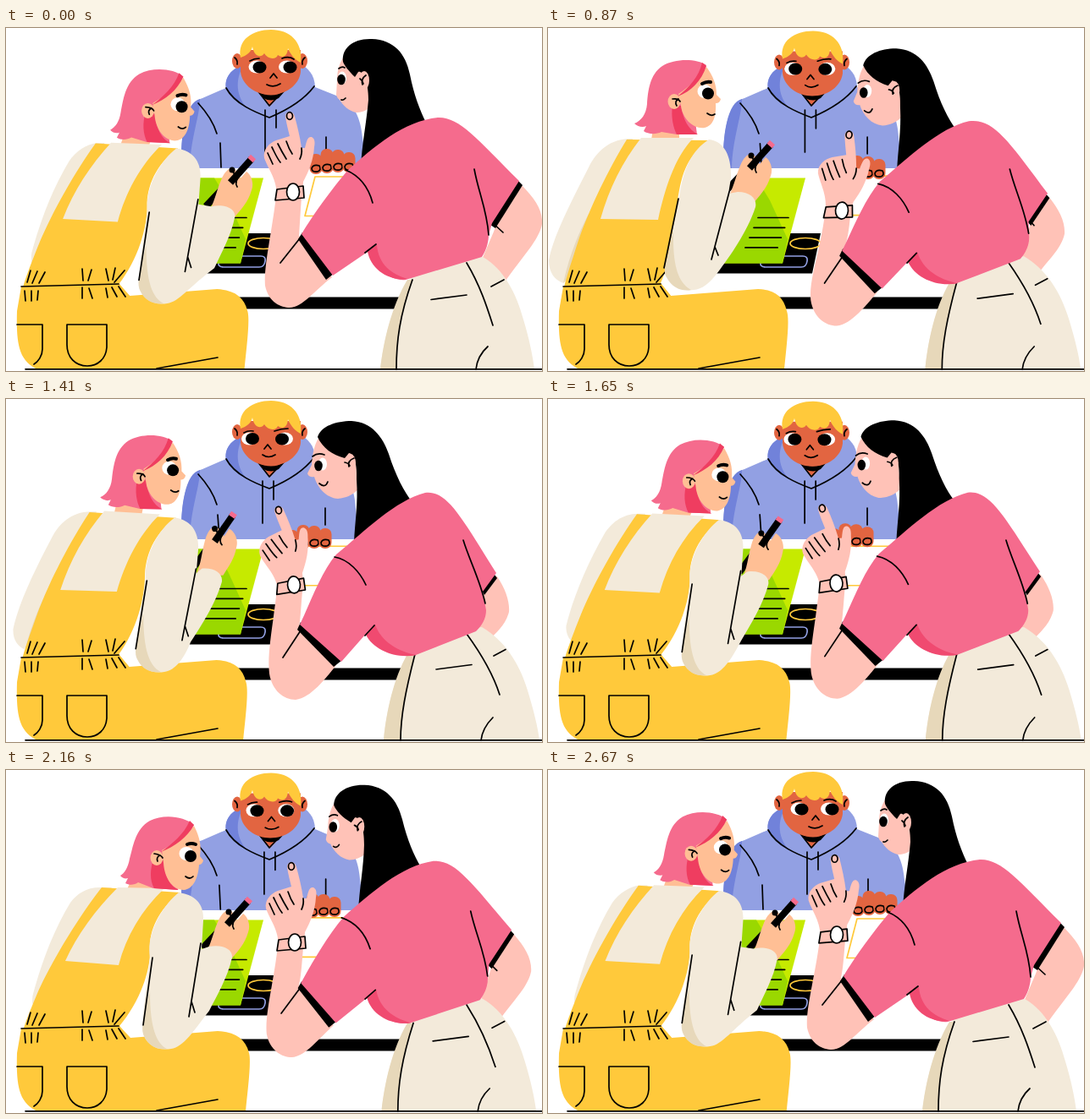
An HTML page for the animation above (2.7 s loop, 633 px wide and 406 px high).

```html
<!DOCTYPE html>
<html lang="en">
<head>
<meta charset="utf-8">
<title>Table talk</title>
<style>
html, body { margin: 0; width: 100%; height: 100%; overflow: hidden; background: #fff; }
svg { display: block; width: 100%; height: 100%; }
</style>
</head>
<body>
<svg id="stage" viewBox="0 0 633 406"></svg>
<script>
const LOOP = 2700, STEP = 30;
const TIMES = [0, 420, 870, 1410, 1890, 2160, 2670];
const C = {
  ink: '#000', white: '#fff', yellow: '#ffc93b', pink: '#f56b8d', red: '#ef3d60', rose: '#f04a70',
  blue: '#92a0e3', navy: '#7182da', brick: '#e26541', blush: '#ffc2b7', peach: '#ffbf95',
  cream: '#f3eada', sand: '#e7d8ba', lime: '#c6ea00', green: '#9ad800'
};

// Motion tracks, one value per time in TIMES
const tracks = {
  lean:   [.64, .03, 0, .28, .9, 1, .69],
  elbow:  [.8, .03, 0, .65, .97, 1, .85],
  cuff:   [1.15, .15, 0, .45, .9, 1, 1.17],
  far:    [.95, .35, 0, .24, 1, 1, 1],
  bend:   [0, .04, .86, 1, .83, .36, 0],
  back:   [0, .05, .59, 1, .77, .33, 0],
  bob:    [0, 0, 1.5, 0, 1.5, 1.5, 0],
  wristX: [338, 326, 346, 339, 340, 340, 340],
  wristY: [194, 196, 216, 220, 214, 204, 195],
  wristA: [0, -21, 8, -9, -6, 0, 1],
  penX:   [270, 246, 243, 252, 262, 266, 271],
  penY:   [188, 173, 171, 173, 185, 188, 189],
  penA:   [0, 5, 0, -7, -5, 0, 0],
  fistX:  [0, 0, -14, -28, -28, -17, 0],
  fistY:  [0, -1, 8, 6, 3, 3, 0]
};

const N = TIMES.length;
const keyTime = i => TIMES[(i + N) % N] + LOOP * Math.floor(i / N);
const keyVal = (v, i) => v[(i + N) % N];
function slope(v, i) {
  const a = (keyVal(v, i) - keyVal(v, i - 1)) / (keyTime(i) - keyTime(i - 1));
  const b = (keyVal(v, i + 1) - keyVal(v, i)) / (keyTime(i + 1) - keyTime(i));
  return a * b > 0 ? 2 * a * b / (a + b) : 0;
}
// Smooth periodic curve without overshoot
function sample(v, t) {
  let i = N - 1;
  while (TIMES[i] > t) i--;
  const h = keyTime(i + 1) - keyTime(i), u = (t - keyTime(i)) / h, w = 1 - u;
  return w * w * (1 + 2 * u) * keyVal(v, i) + u * u * (3 - 2 * u) * keyVal(v, i + 1)
    + h * u * w * (w * slope(v, i) - u * slope(v, i + 1));
}

const NUM = /-?\d*\.?\d+/g;
function mix(a, b, k) {
  const to = b.match(NUM);
  let i = 0;
  return a.replace(NUM, n => (+n + (to[i++] - n) * k).toFixed(2));
}

const stage = document.getElementById('stage');
const updates = [];
let layer = stage;

function make(tag, attrs) {
  const el = document.createElementNS('http://www.w3.org/2000/svg', tag);
  for (const k in attrs) el.setAttribute(k, attrs[k]);
  return layer.appendChild(el);
}
const pen = (color = C.ink, width = 1.7) => ({
  fill: 'none', stroke: color, 'stroke-width': width, 'stroke-linecap': 'round', 'stroke-linejoin': 'round'
});
const outlined = fill => ({ ...pen(), fill });

// A path is fixed, or built of [track, from, to] pieces
function path(style, ...segs) {
  const el = make('path', style);
  if (typeof segs[0] === 'string') el.setAttribute('d', segs[0]);
  else updates.push(s => el.setAttribute('d', segs.map(([k, a, b]) => mix(a, b, s[k])).join(' ')));
}
const fill = (color, ...segs) => path({ fill: color }, ...segs);
const line = (...segs) => path(pen(), ...segs);
const oval = (style, cx, cy, rx, ry) => make('ellipse', { ...style, cx, cy, rx, ry });
function group(move, draw) {
  const outer = layer;
  const el = layer = make('g', {});
  draw();
  layer = outer;
  updates.push(s => el.setAttribute('transform', move(s)));
}
function blob(color, track, a, b, rx, ry) {
  const el = oval({ fill: color }, a[0], a[1], rx, ry);
  updates.push(s => ['cx', 'cy'].forEach((k, i) => el.setAttribute(k, a[i] + (b[i] - a[i]) * s[track])));
}

function man() {
  fill(C.blue, ['bend',
    'M207 166 C206 125 212 88 232 83 L262 70 L365 70 L395 82 C412 90 419 108 421 130 C424 146 422 158 422 166Z',
    'M207 166 C206 125 212 88 232 83 L262 70 L365 70 L390 82 C405 90 412 108 413 130 C415 146 414 158 414 166Z']);
  fill(C.navy, 'M207 166 C206 125 212 88 229 84 C229 104 218 130 217 166Z');
  line('M227 89 C239 102 245 112 249 125');
  line(['bend', 'M253 136 L254 165 M378 129 L378 148', 'M250 137 L252 165 M377 129 L377 149']);
  fill(C.blue, 'M282 42 C262 50 258 62 260 72 C270 90 295 100 311 106 C330 98 352 85 365 69 C364 55 357 47 346 42Z');
  fill(C.navy, 'M282 42 C262 50 258 62 260 72 C268 84 276 90 285 95 C269 78 272 56 282 42Z');
  line('M260 71 C270 90 295 100 311 106 C330 98 352 85 364 69');
  line(['bend', 'M306 97 V147 M319 97 V118', 'M303 97 V147 M316 97 V119']);
  fill(C.brick, 'M291 66 L312 92 L337 66Z');
  fill(C.ink, 'M296 74 Q313 85 330 74 L322 83 Q313 88 304 83Z');
  line('M297 74 L311 92 L328 74');
  group(s => `translate(0 ${s.bob})`, () => {
    for (const x of [273, 350]) oval({ fill: C.brick }, x, 39, 6, 9);
    line('M270 35 Q274 38 273 43 M353 35 Q349 38 350 43');
    fill(C.brick, 'M277 26 V52 C279 68 295 79 312 79 C330 79 346 68 348 52 V26Z');
    fill(C.yellow, 'M277 35 C273 14 291 2 313 2 C335 2 351 16 348 41 C342 38 336 32 333 24 C332 34 327 36 321 32 C319 38 309 37 305 30 C301 36 293 34 291 22 C290 28 284 33 277 35Z');
    blob(C.white, 'bend', [296, 46], [287.5, 47], 9.5, 7.5);
    blob(C.white, 'bend', [331.5, 46], [329.5, 47], 9.5, 7.5);
    blob(C.ink, 'bend', [299.5, 46.5], [291, 47], 8, 7);
    blob(C.ink, 'bend', [335.5, 46.5], [326, 47.5], 8, 7);
    line(['bend',
      'M288 39 Q293 36 299 36 M326 36 Q334 33 340 37 M312 59 L316 54 L320 59 M308 67 Q316 71 324 66',
      'M281 40 Q286 37 292 38 M317 38 Q325 35 333 35 M305 59 L309 54 L313 59 M303 66 Q310 71 318 66']);
  });
}

function table() {
  fill(C.ink, 'M262 318.500 H490 V332.500 H262Z M198 243 H322 L312 290.500 H188Z');
  oval(pen(C.yellow), 304, 255, 18, 6.500);
  path(pen(C.blue), 'M259 270 H301 Q307 270 306 276 Q305 283 299 283 H257 Q250 283 251 277 Q252 270 259 270Z');
  fill(C.lime, 'M225 177.500 H304 L277 278.500 H194Z');
  fill(C.green, 'M225 177.500 H246 L262 204 L283 250 L277 278.500 H194Z');
  for (let i = 0; i < 4; i++) line(`M${248 - i * 5} ${224.5 + i * 11.8} H${284 - i * 4.3}`);
  group(s => `translate(${s.fistX} ${s.fistX / 16})`, () =>
    path(pen(C.yellow), 'M365 176 H440 L425 222.500 H353Z'));
  group(s => `translate(${s.fistX} ${s.fistY})`, () => {
    [[366, 149, 173], [379, 143, 172], [392, 144, 171], [405, 147, 171]].forEach(([x, top, end]) => {
      make('rect', { fill: C.brick, x: x - 7.5, y: top, width: 15, height: end - top, rx: 7 });
      line(`M${x - 5} ${end - 7} Q${x - 3} ${end - 12} ${x + 4} ${end - 10} Q${x + 7} ${end - 5} ${x + 2} ${end - 3} Q${x - 5} ${end - 2} ${x - 5} ${end - 7}Z`);
    });
  });
}

function rightHand() {
  const arm = make('path', { fill: C.blush });
  updates.push(s => {
    const x = s.wristX, y = s.wristY;
    const low = mix('304 280 306 305 C310 325 325 331 335 331 C350 331 365 310 385 295 L346 246',
      '308 300 311 325 C314 345 328 356 342 356 C360 354 378 330 390 315 L346 270', s.bend);
    arm.setAttribute('d', `M${x - 18} ${y - 4} C${x - 23} ${y + 45} ${low} C${x + 9} ${y + 40} ${x + 10} ${y + 15} ${x + 12} ${y - 4}Z`);
  });
  line(['bend', 'M324 278 L347 249', 'M327 306 L348 274']);
  group(s => `translate(${s.wristX} ${s.wristY}) rotate(${s.wristA})`, () => {
    fill(C.blush, 'M-18 6 C-18 -16 -28 -26 -33 -40 C-35 -50 -27 -58 -19 -61 L-3 -66 C-5 -74 -7 -82 -8 -89 C-8 -96 1 -97 3 -89 C6 -78 9 -66 11 -52 L15 -52 C17 -60 18 -66 23 -65 C27 -63 27 -58 26 -53 C25 -38 20 -25 13 -12 L12 6Z');
    line('M-29 -46 L-23 -33 M-24 -53 C-20 -45 -18 -40 -14 -35 M-17 -57 Q-12 -47 -7 -39 M-7 -60 Q-4 -51 0 -45 M11 -52 Q12 -45 9 -39');
    oval(outlined(C.blush), -3, -90, 3.500, 4.300);
  });
  group(s => `translate(${s.wristX} ${s.wristY}) rotate(${s.wristA * .45})`, () => {
    path(outlined(C.blush), 'M-18 -3 L13 -7 L14 7 L-20 10Z');
    oval(outlined(C.white), 1, 0, 7.500, 10);
  });
}

function rightWoman() {
  fill(C.blush, ['back',
    'M598 182 L609 186 C625 203 634 215 633 232 C630 250 612 268 590 299 L562 274 L576 241Z',
    'M572 208 L580 210 C590 225 595 240 594 252 C590 268 578 277 572 284 L558 272 L563 234Z']);
  fill(C.ink, ['back', 'M603 179 L610 186 L578 237 L569 231Z', 'M574 204 L580 212 L565 232 L559 222Z']);
  line(['back', 'M574 230 L587 242', 'M561 222 L565 228']);

  fill(C.cream, ['bend',
    'M478 294 L548 272 L563 271 C588 285 603 315 611 345 C618 368 622 388 624 404 H442 C446 370 455 330 476 300Z',
    'M478 300 L545 272 L562 270 C588 285 606 312 616 345 C623 368 628 388 630 404 H446 C449 370 458 330 476 302Z']);
  fill(C.sand, ['bend',
    'M480 298 C465 340 461 370 461 404 H442 C446 370 455 330 474 298Z',
    'M483 302 C472 345 466 375 466 404 H446 C449 370 458 330 474 302Z']);
  line(['bend',
    'M480 298 C465 340 461 370 461 404 M544 278 C560 305 568 330 575 352 M502 321.500 L544 316 M573 306 L588 298 M569 377 C560 385 556 395 555 404',
    'M483 302 C472 345 466 375 466 404 M544 278 C560 300 575 325 583 350 M508 320 L550 314.500 M576 304 L590 296.500 M575 377 C567 385 562 395 561 404']);

  fill(C.blush, ['bend',
    'M404 28 C394 38 391 50 391 62 L390 79 C391 82 392 84 394 85 C398 92 405 98 413 100 C420 100 424 98 429 95 L428 30Z',
    'M372 42 C364 52 362 65 361 78 L356 88 C357 92 361 93 364 92 C368 105 378 117 392 118 C402 117 408 114 415 108 L412 50Z']);
  blob(C.white, 'bend', [397, 59], [374, 77], 5, 7.500);
  blob(C.ink, 'bend', [396, 61], [369, 79], 4.800, 6.300);
  line(['bend',
    'M393 48 Q397 45 400 47 M396 85 Q398 86 401 83',
    'M362 68 Q368 63 376 66 M370 100 Q377 106 380 98']);
  fill(C.ink, ['bend',
    'M398 40 C396 24 410 12 432 13 C458 14 472 30 477 55 C482 80 488 95 496 112 L460 150 L419 165 C420 140 426 110 428 85 C428 60 420 50 416 52 L412 58 C404 50 400 45 398 40Z',
    'M368 45 C372 32 390 26 408 26 C432 27 445 45 452 65 C460 90 470 110 480 122 L450 155 L411 170 C412 145 416 125 414 95 C415 75 410 64 405 64 L400 70 C385 66 374 58 368 45Z']);
  blob(C.blush, 'bend', [423, 62], [407, 76], 6, 11);
  line(['bend', 'M425 56 Q419 60 421 67 M418 60 Q421 62 422 66', 'M411 70 Q403 73 405 80 M400 75 Q405 76 406 79']);

  rightHand();
  fill(C.ink, ['bend', 'M350 242 L345 250 L378 298 L388 290Z', 'M348 264 L344 273 L387 317 L397 309Z']);
  fill(C.pink,
    ['bend', 'M349 244 C362 222 385 190 404 168 C435 140 470 110 510 106', 'M347 267 C360 240 372 205 390 184 C425 155 460 120 495 111'],
    ['back', 'C535 105 555 130 606 181 L574 231 L570 245 C570 255 566 265 562 271', 'C520 108 535 135 579 206 L563 228 L567 250 C567 262 560 270 555 275'],
    ['bend', 'L472 298 C455 300 437 285 427 265 L386 293Z', 'L484 303 C460 306 436 297 425 278 L396 311Z']);
  fill(C.rose, ['bend',
    'M427 264 C430 285 452 300 474 297 C455 291 440 280 438 257Z',
    'M425 279 C434 297 460 308 485 303 C463 299 443 287 436 267Z']);
  line(['bend',
    'M401 168 C418 175 428 188 433 207 M424 266 L437 256',
    'M388 187 C405 190 418 205 425 220 M424 280 L435 268']);
  line(['back', 'M553 167 C558 195 568 215 570 245', 'M540 167 C547 190 560 215 566 242']);
}

function leftBody() {
  fill(C.peach, ['lean', 'M124 120 L155 120 L155 132 L122 132Z', 'M148 130 L182 136 L174 149 L143 141Z']);
  fill(C.cream,
    ['lean', 'M100 131 L95 131', 'M125 139 L114 139'],
    ['far',
      'C70 132 55 150 48 165 C25 210 5 250 1 275 C1 290 8 298 18 302 L60 260 L100 140Z',
      'C96 138 84 146 76 157 C56 190 42 228 32 265 C31 268 31 273 31 277 L70 260 L120 145Z']);
  fill(C.sand, ['far', 'M18 302 C25 270 35 245 48 220 L52 240 L30 290Z', 'M38 276 C45 262 52 248 60 230 L65 240 L45 280Z']);
  fill(C.yellow,
    ['lean',
      'M93 132 C70 170 45 220 30 270 C20 300 14 320 13 350 L60 340 L146 318 L133 302',
      'M113 139 C85 175 55 225 38 262 C22 300 14 320 13 350 L60 340 L146 318 L134 303'],
    ['elbow', 'C145 275 150 240 153 205 C158 170 165 150 192 133Z', 'C155 278 172 240 170 208 C170 185 185 160 206 145Z']);
  fill(C.cream,
    ['lean', 'M110 130 C88 158 72 190 62 226 L130 227', 'M132 139 C106 165 84 195 70 226 L133 231'],
    ['elbow', 'C138 190 150 152 172 130Z', 'C142 196 160 166 187 140Z']);
  fill(C.yellow, ['lean',
    'M13 335 C12 370 14 395 38 404 H279 C281 382 286 345 282 335 C278 318 268 310 248 309 L145 317 L133 302 L18 306Z',
    'M13 335 C12 370 14 395 38 404 H283 C285 382 290 345 287 335 C283 318 270 310 250 309 L147 317 L133 302 L18 306Z']);
  line('M18 306 L133 303 M13 351 H43 V380 C43 388 38 395 33 398 M72 351 H119 V378 C118 392 108 400 96 400 C82 400 72 390 72 375Z M178 403 L250 390');
  line('M29 287 L25 301 M37 288 L31 302 M46 289 L39 302 M22 311 L23 323 M30 311 V323 M38 311 L37 322 M90 285 L91 299 M101 286 L97 299 M90 307 V320 M98 308 L102 320 M118 285 L121 299 M129 284 L126 298 M140 287 L128 301 M118 308 L120 319 M125 307 L131 318 M133 306 L141 318');
}

function leftArm() {
  group(s => `translate(${s.penX} ${s.penY}) rotate(${s.penA})`, () => {
    const stick = { fill: 'none', stroke: C.ink, 'stroke-width': 8 };
    path(stick, 'M-34 23 L0 -13');
    fill(C.peach, 'M-32 32 C-24 20 -22 6 -16 -8 C-11 -20 -4 -25 1 -20 L7 -10 L14 -18 C20 -14 23 -4 20 4 C16 18 8 26 0 36Z');
    path(stick, 'M-5 -5 L20 -33');
    path({ ...stick, stroke: C.pink }, 'M18.500 -31.500 L22 -35.500');
    oval({ fill: C.ink }, -3, -20, 3.500, 3.500);
    line('M-2 -18 Q2 -12 0 -7 M7 -14 Q-1 -6 3 0');
  });
  fill(C.cream,
    ['elbow', 'M190 132 C210 134 217 155 216 178 L213 196', 'M204 145 C225 148 234 160 233 178 L231 212'],
    ['cuff', 'L224 194 C240 194 247 203 245 212 C236 240 215 270 200 290', 'L240 209 C255 206 268 212 267 222 C262 245 250 265 240 285'],
    ['elbow',
      'C190 303 182 309 172 310 C158 312 146 306 140 292 C138 280 150 225 155 200 C160 165 170 145 190 132Z',
      'C222 308 210 328 195 330 C178 333 164 325 161 308 C162 280 168 240 170 222 C165 195 185 160 204 145Z']);
  fill(C.sand, ['elbow',
    'M143 262 C138 280 136 290 140 295 C147 309 160 312 169 310 C155 302 147 285 148 240Z',
    'M165 280 C161 298 160 308 163 315 C169 328 180 331 190 330 C178 324 170 306 170 262Z']);
  line(['elbow',
    'M154 202 L137 284 M214 194 L193 274 M197 259 L201 269',
    'M173 222 L162 302 M230 205 L216 292 M219 274 L223 287']);
}

function leftHead() {
  fill(C.pink, ['lean',
    'M187 44 C175 36 150 36 135 45 C120 55 118 75 117 90 C116 102 110 110 102 113 C106 117 112 118 116 116 L113 122 C118 126 128 126 134 123 L152 126 L176 126 L170 80Z',
    'M222 65 C210 54 185 52 170 60 C152 70 150 92 146 105 C144 116 140 122 135 125 C137 128 141 129 144 128 L141 134 C146 137 152 136 156 133 L174 140 L203 142 L200 100Z']);
  fill(C.red, ['lean',
    'M147 92 C145 105 148 118 152 126 L177 126 C166 120 160 110 157 92Z',
    'M176 100 C169 118 170 131 175 140 L204 142 C194 138 187 125 187 108Z']);
  fill(C.peach, ['lean',
    'M187 46 C195 57 199 67 199 79 L204 84 C203 88 201 89 198 89 C199 104 195 116 185 118 C172 120 159 108 157 92 L154 78 C166 70 178 60 187 46Z',
    'M222 66 C229 80 231 90 229 102 L233 107 C232 111 230 112 228 112 C227 128 221 141 210 142 C196 142 187 127 186 110 L184 95 C198 88 211 79 222 66Z']);
  fill(C.red, ['lean',
    'M182 41 L187 45 C181 63 169 75 153 81 C167 70 178 58 182 41Z',
    'M217 60 L222 65 C214 80 200 90 183 97 C197 87 210 76 217 60Z']);
  blob(C.peach, 'lean', [149, 87], [178, 104], 7.500, 9);
  line(['lean', 'M147 84 Q154 83 156 87 M154 84 Q149 87 152 92', 'M175 99 Q183 100 185 104 M182 101 Q177 103 179 108']);
  blob(C.white, 'lean', [185, 75], [213, 99], 8.5, 8);
  blob(C.ink, 'lean', [189, 77.5], [218, 102], 7, 7);
  path(pen(C.ink, 4), ['lean', 'M182 66 Q187 63 192 64', 'M214 88 Q219 86 224 88']);
  line(['lean', 'M188 101 Q193 105 197 102', 'M212 126 Q217 130 221 126']);
}

man();
table();
rightWoman();
leftBody();
leftArm();
leftHead();
line('M23 403.800 H633');

function draw(now) {
  const t = Math.floor(now % LOOP / STEP) * STEP, state = {};
  for (const k in tracks) state[k] = sample(tracks[k], t);
  for (const f of updates) f(state);
}
draw(0);
let start;
requestAnimationFrame(function tick(now) {
  if (start === undefined) start = now;
  draw(now - start);
  requestAnimationFrame(tick);
});
</script>
</body>
</html>
```
